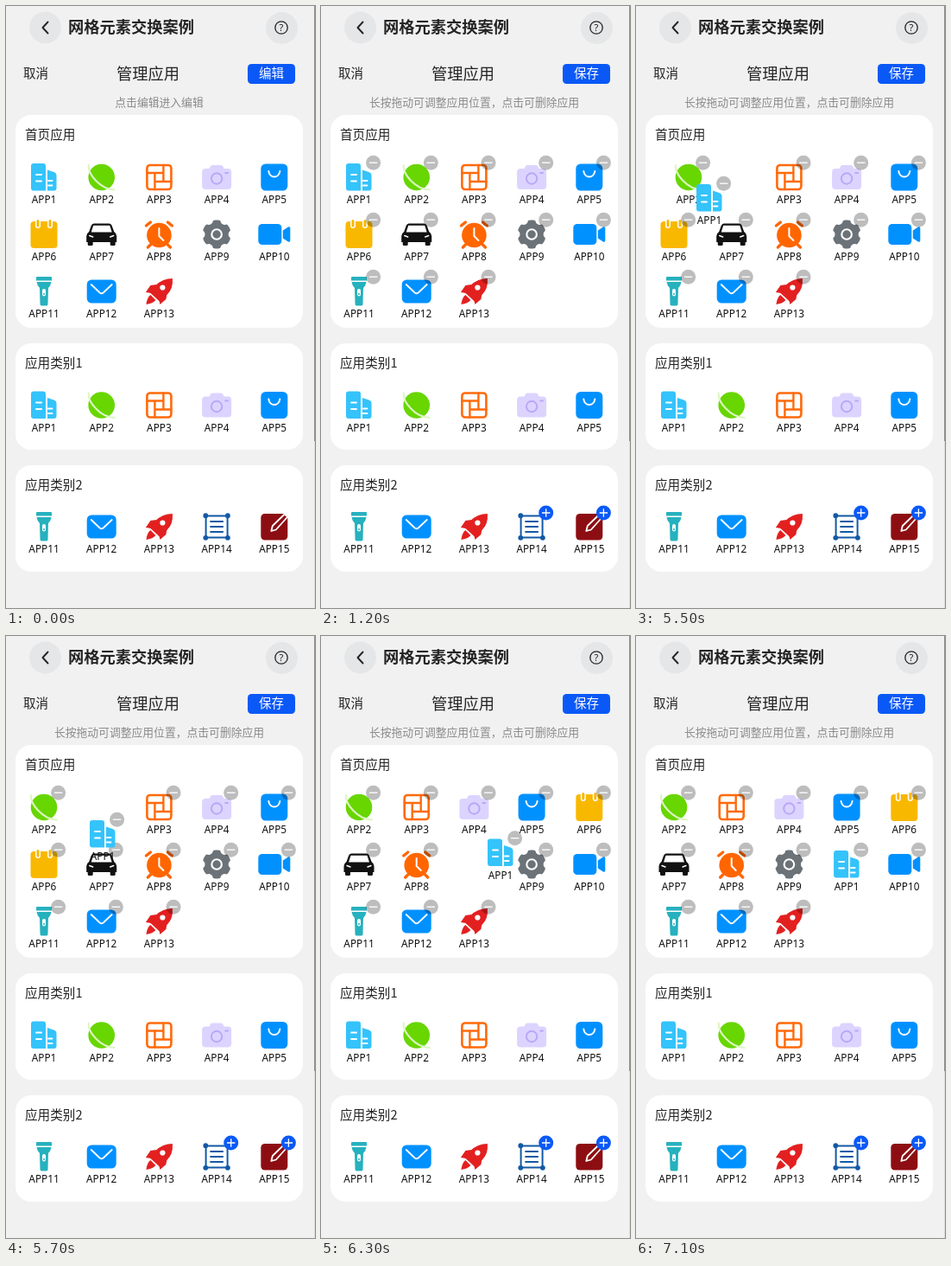
Animation, 358 px wide and 696 px high, one loop 8000 ms. Source, as an HTML page with a canvas:

```html
<!DOCTYPE html>
<html lang="zh-CN">
<head>
<meta charset="utf-8">
<title>网格元素交换案例</title>
<style>
html, body { margin: 0; width: 100%; height: 100%; overflow: hidden; background: #f1f1f1; }
canvas { display: block; width: 358px; height: 696px; }
</style>
</head>
<body>
<canvas id="stage"></canvas>
<script>
const W = 358, H = 696, LOOP = 8000, STEP = 100;
const PRESS = 1100, EDIT = 1200, LIFT = 5300, DROP = 6800;
const BLUE = '#0a59f7', SKY = '#0091ff', WHITE = '#fff', INK = '#242424';
const CJK = '"Noto Sans CJK SC", "Noto Sans CJK", sans-serif';
const LATIN = '"Noto Sans", "Open Sans", sans-serif';

const canvas = document.getElementById('stage');
const ctx = canvas.getContext('2d');
const ratio = window.devicePixelRatio || 1;
canvas.width = W * ratio;
canvas.height = H * ratio;

// SVG path builders
const box = (x, y, w, h, r) =>
  `M${x + r} ${y}h${w - 2 * r}a${r} ${r} 0 0 1 ${r} ${r}v${h - 2 * r}a${r} ${r} 0 0 1 ${-r} ${r}` +
  `h${2 * r - w}a${r} ${r} 0 0 1 ${-r} ${-r}v${2 * r - h}a${r} ${r} 0 0 1 ${r} ${-r}z`;
const disc = (x, y, r) =>
  `M${x - r} ${y}a${r} ${r} 0 1 0 ${2 * r} 0a${r} ${r} 0 1 0 ${-2 * r} 0z`;
const corners = (d, r) =>
  disc(-d, -d, r) + disc(d, -d, r) + disc(-d, d, r) + disc(d, d, r);

function gear() {
  let d = '';
  for (let i = 0; i < 72; i++) {
    const a = i * Math.PI / 36;
    const r = 15.1 + 1.5 * Math.tanh(3 * Math.cos(6 * a) + 1);
    d += `${i ? 'L' : 'M'}${(r * Math.sin(a)).toFixed(2)} ${(r * Math.cos(a)).toFixed(2)}`;
  }
  return d + 'z';
}

// Layers: [colour, path, line width]; no width means fill
const ICONS = {
  1: [
    ['#34c3fb', 'M-12-16H-1Q2-16 2-13V15.5H-12Q-15 15.5-15 12.5V-13Q-15-16-12-16z'],
    ['#34c3fb', 'M4-8.5L11.5-6Q14.5-5 14.5-2V12.500Q14.500 15.5 11.5 15.5H4z'],
    [WHITE, 'M-9-3H-3M-9 4.5H-3M5 4H9.5M5 9.5H9.5', 1.9]
  ],
  2: [
    ['#68d600', disc(0, 0, 15.3)],
    ['#dcf6c2', 'M-15-14C-16-4-2 14 15 14.5', 2.1]
  ],
  3: [
    ['#ff6a0b', box(-14, -14, 28, 28, 3.5), 2.6],
    ['#ff6a0b', 'M-14-5H5M5-14V5M14 5H-5M-5 14V-5', 2.4]
  ],
  4: [
    ['#dcd4ff', box(-17, -10, 34, 24, 4)],
    ['#dcd4ff', 'M-9-9L-7-13Q-6-14-5-14H5Q6-14 7-13L9-9z'],
    ['#b9a8f6', disc(0, 1.5, 6.2), 2],
    ['#b9a8f6', 'M10-5H13', 1.8]
  ],
  5: [
    [SKY, box(-15.5, -15.5, 31, 31, 5.5)],
    [WHITE, 'M-6.5-7C-5.5 1.5 5.5 1.5 6.5-7', 2]
  ],
  6: [
    ['#f9b800', box(-15.5, -15, 31, 31, 4)],
    [WHITE, box(-10, -18, 6, 11, 3) + box(4, -18, 6, 11, 3)],
    ['#f9b800', box(-8.5, -17, 3, 8.5, 1.5) + box(5.5, -17, 3, 8.5, 1.5)]
  ],
  7: [
    ['#111', 'M-9-12.5H9Q11-12.5 12-10L14.500-3Q17.5-1 17.5 2V9H-17.5V2Q-17.5-1-14.500-3L-12-10Q-11-12.5-9-12.5z'],
    ['#111', box(-16, 7, 6, 6, 1.5) + box(10, 7, 6, 6, 1.5)],
    [WHITE, 'M-12-2.5L-9.5-10.2H9.5L12-2.5z'],
    [WHITE, 'M-14 1.5L-10 3M14 1.5L10 3', 1.4]
  ],
  8: [
    ['#ff6600', disc(0, 1, 14.3)],
    ['#ff6600', 'M-15-10L-10-14M15-10L10-14M-10 12L-13 15M10 12L13 15', 3.4],
    [WHITE, 'M0-7V2L5 7', 2]
  ],
  9: [
    ['#6b7278', gear()],
    [WHITE, disc(0, 0, 5.8), 2.1]
  ],
  10: [
    [SKY, box(-18.5, -12, 27, 24, 4.5)],
    [SKY, 'M10-4.5L16-8.500Q18.500-9.500 18.500-7V7Q18.500 9.5 16 8.500L10 4.5z']
  ],
  11: [
    ['#26b1be', 'M-8-17H8Q9-17 9-16V-12.5H-9V-16Q-9-17-8-17z'],
    ['#26b1be', 'M-8.5-11H8.5Q8-7 5-4L4.5 14.5Q4.5 16.500 3 16.500H-3Q-4.500 16.500-4.500 14.500L-5-4Q-8-7-8.500-11z'],
    [WHITE, box(-2, -3, 4, 8.5, 2)],
    ['#26b1be', disc(0, 3, 1.1)]
  ],
  12: [
    [SKY, box(-17, -13.5, 34, 27, 5.5)],
    [WHITE, 'M-12-8L-2 1.5Q0 3 2 1.5L12-8', 1.8]
  ],
  13: [
    ['#e32020', 'M15.5-15Q16.500-3 9 4L1 12L-11 1L-4-7Q4-15 15.5-15z'],
    ['#e32020', 'M-3-8L-10-7L-15.5 1L-9 2zM9 3L8 9L1 15L0 10z'],
    ['#e32020', 'M-10 4Q-14 7-15 15Q-7 14-4 10z'],
    [WHITE, disc(4, -4.5, 3.1)]
  ],
  14: [
    ['#1259a5', box(-12.5, -12.5, 25, 25, 0), 2],
    ['#1259a5', corners(12.8, 2.9)],
    ['#1259a5', 'M-7-6H7M-7 0H7M-7 6H7', 2]
  ],
  15: [
    ['#8d0e12', box(-15.5, -15, 31, 30.5, 4.5)],
    [WHITE, 'M-3.5 5L-2-1L12-14.500L15.5-11.500L2 3.500z', 1.8]
  ]
};
for (const layers of Object.values(ICONS)) {
  for (const layer of layers) layer[1] = new Path2D(layer[1]);
}

function text(s, x, y, size, { color = INK, align = 'left', weight = 400, font = CJK } = {}) {
  ctx.font = `${weight} ${size}px ${font}`;
  ctx.textAlign = align;
  ctx.textBaseline = 'alphabetic';
  ctx.fillStyle = color;
  ctx.fillText(s, x, y);
}

function fillBox(x, y, w, h, r, color) {
  ctx.fillStyle = color;
  ctx.fill(new Path2D(box(x, y, w, h, r)));
}

function line(path, color, width) {
  ctx.strokeStyle = color;
  ctx.lineWidth = width;
  ctx.stroke(new Path2D(path));
}

function dot(x, y, r, color) {
  ctx.fillStyle = color;
  ctx.beginPath();
  ctx.arc(x, y, r, 0, 2 * Math.PI);
  ctx.fill();
}

function badge(x, y, plus) {
  dot(x, y, 8.5, plus ? BLUE : 'rgba(0,0,0,.26)');
  line(`M${x - 4.7} ${y}h9.4` + (plus ? `M${x} ${y - 4.7}v9.4` : ''), WHITE, 1.3);
}

function cell(app, [x, y], mark, alpha = 1) {
  ctx.save();
  ctx.globalAlpha = alpha;
  ctx.translate(x, y);
  ctx.lineCap = ctx.lineJoin = 'round';
  for (const [color, path, width] of ICONS[app]) {
    ctx.fillStyle = ctx.strokeStyle = color;
    if (width) {
      ctx.lineWidth = width;
      ctx.stroke(path);
    } else {
      ctx.fill(path);
    }
  }
  text('APP' + app, 0, 30.2, 11.8, { color: '#111', align: 'center', weight: 500, font: LATIN });
  ctx.lineCap = 'butt';
  if (mark) badge(16.6, mark === 'add' ? -16 : -16.8, mark === 'add');
  ctx.restore();
}

const slot = (i, top = 198) => [44 + 66.7 * (i % 5), top + 66 * Math.floor(i / 5)];
const mix = (a, b, p) => a.map((v, i) => v + (b[i] - v) * p);
const easeOut = p => 1 - (1 - p) ** 3;
const clamp = v => Math.min(1, Math.max(0, v));

// The dragged app takes a new place in the list at each of these times
const MOVES = [[5390, 1], [5700, 7], [6435, 8]];
const SHIFT = 300;

// Pointer path: time, x, y
const DRAG = [
  [5300, 59, 211], [5500, 85, 222], [5700, 112, 229], [5900, 165, 235],
  [6200, 196, 243], [6400, 220, 258], [6600, 237, 268], [6800, 244.1, 264]
];

// Index of another app (2..13) when app 1 sits at place k
const place = (app, k) => app - 2 < k ? app - 2 : app - 1;

function restPos(app, t) {
  let k = 0, pos = slot(place(app, 0));
  for (const [start, next] of MOVES) {
    if (place(app, next) !== place(app, k)) {
      pos = mix(pos, slot(place(app, next)), easeOut(clamp((t - start) / SHIFT)));
    }
    k = next;
  }
  return pos;
}

function dragPos(t) {
  if (t < LIFT) return slot(0);
  if (t >= DROP) return slot(8);
  const i = DRAG.findIndex(p => p[0] > t);
  const [a, b] = [DRAG[i - 1], DRAG[i]];
  return mix(a, b, (t - a[0]) / (b[0] - a[0])).slice(1);
}

function header(t) {
  const editing = t >= EDIT;
  dot(45.5, 25, 18.5, '#e5e6e8');
  dot(319.5, 25.5, 18.5, '#e5e6e8');
  ctx.lineCap = ctx.lineJoin = 'round';
  line('M48.5 18.5L42.5 25L48.5 31.5', INK, 1.9);
  line(disc(319, 25, 7.2), INK, 1.3);
  ctx.lineCap = 'butt';
  text('?', 319, 28.8, 11, { align: 'center', weight: 500, font: LATIN });
  text('网格元素交换案例', 72, 31, 18.25, { weight: 700 });
  text('取消', 20, 83.3, 14.5);
  text('管理应用', 164.5, 84.5, 18.25, { align: 'center' });
  fillBox(280, 67, 55, 23, 4.5, t >= PRESS && !editing ? '#0950de' : BLUE);
  text(editing ? '保存' : '编辑', 307.5, 83.3, 14.5, { color: WHITE, align: 'center', weight: 500 });
  text(editing ? '长按拖动可调整应用位置，点击可删除应用' : '点击编辑进入编辑',
    177.5, 116, 12.8, { color: '#8a8a8a', align: 'center' });
}

function card(title, y, h) {
  fillBox(11, y, 333, h, 18, WHITE);
  text(title, 22, y + 28, 14.6);
}

function draw(t) {
  const editing = t >= EDIT;
  ctx.setTransform(ratio, 0, 0, ratio, 0, 0);
  ctx.fillStyle = '#f1f1f1';
  ctx.fillRect(0, 0, W, H);
  ctx.fillStyle = '#dcdcdc';
  ctx.fillRect(357, 0, 1, H);
  ctx.fillStyle = '#8a8a8a';
  ctx.fillRect(357, 0, 1, 503);

  header(t);
  card('首页应用', 126, 246);
  card('应用类别1', 390, 123);
  card('应用类别2', 531, 123);

  for (let i = 0; i < 5; i++) {
    cell(i + 1, slot(i, 461.5));
    cell(i + 11, slot(i, 602), editing && i > 2 && 'add');
  }

  const mark = editing && 'remove';
  if (t >= LIFT && t < MOVES[0][0]) cell(1, slot(0), mark, .05);
  for (let app = 2; app <= 13; app++) cell(app, restPos(app, t), mark);
  cell(1, dragPos(t), mark);
}

const begin = performance.now();
function tick() {
  const t = (performance.now() - begin) % LOOP;
  draw(Math.floor(t / STEP) * STEP);
  requestAnimationFrame(tick);
}
tick();
</script>
</body>
</html>
```
